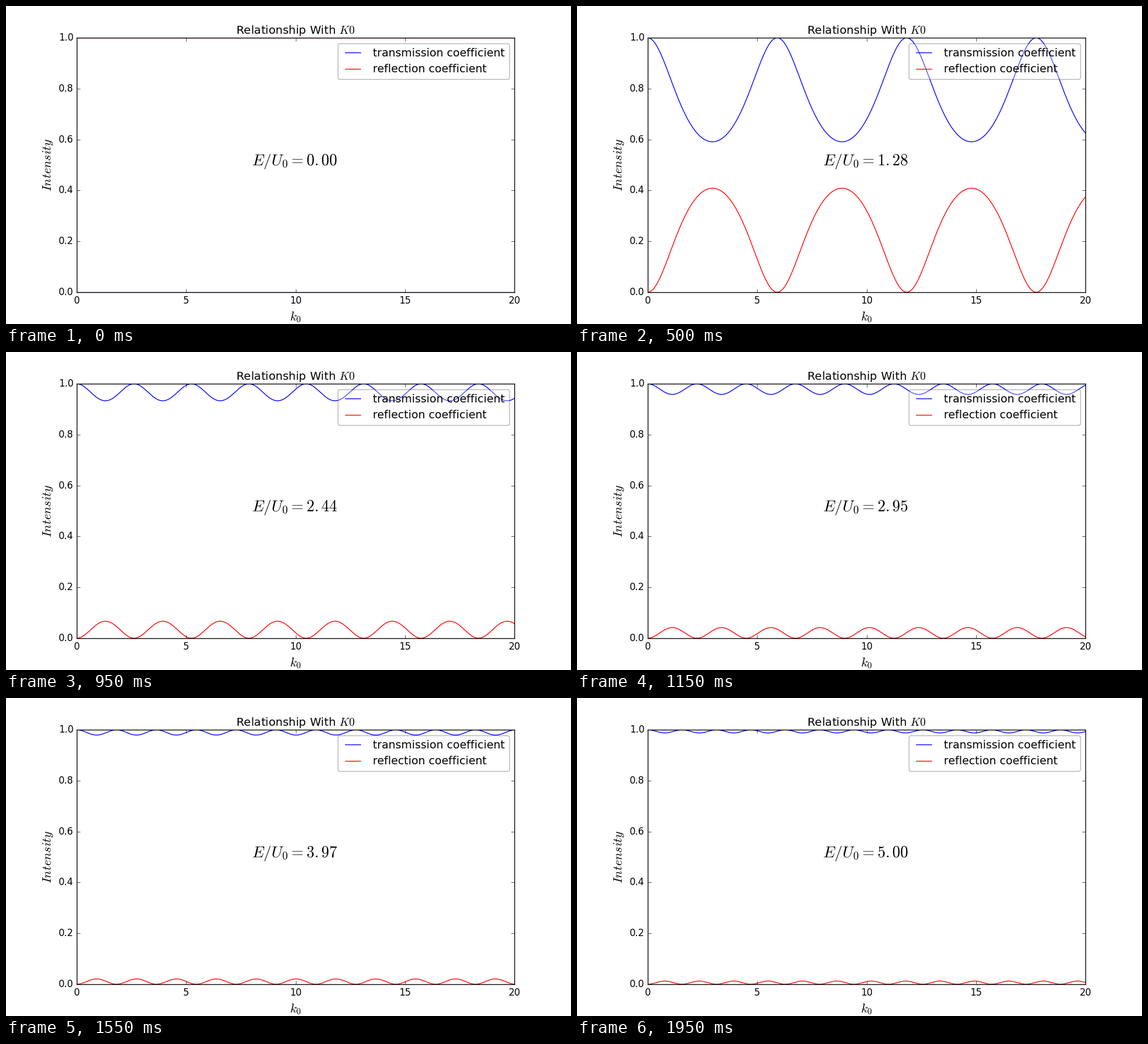
A matplotlib script for the animation above (2000 ms loop, 998 by 561 pixels).

```python
import numpy as np
import matplotlib.pyplot as plt
from matplotlib.animation import FuncAnimation

FRAMES = 40
plt.style.use("classic")
plt.rcParams.update({
    "font.sans-serif": ["DejaVu Sans"],
    "legend.fontsize": 14,
    "xtick.major.pad": 4.7,
})

# Barrier width in reduced units; starts just above 0 to avoid 0/0
k0 = np.linspace(1e-9, 20, 1000)
energies = np.linspace(0, 5, FRAMES)


def transmission(e):
    """Transmission through a square barrier at energy ratio e = E/U0."""
    wave = np.sinh if e < 1 else np.sin
    s2 = wave(k0 * np.sqrt(abs(1 - e))) ** 2
    d = 4 * e * abs(1 - e)
    return d / (d + s2)


def caption(e):
    # The empty group keeps the wide gap after the decimal point
    return "$E/U_0=" + f"{e:.2f}".replace(".", ".{}") + "$"


fig, ax = plt.subplots(figsize=(9.98, 5.61), dpi=100, facecolor="w")
fig.subplots_adjust(left=0.1251, right=0.9001)
trans, = ax.plot([], [], "b", label="transmission coefficient")
refl, = ax.plot([], [], "r", label="reflection coefficient")
note = ax.text(8, 0.5, "", fontsize=20)

ax.set_xlim(0, 20)
ax.set_ylim(0, 1)
ax.set_title("Relationship With $K0$")
ax.set_xlabel("$k_0$", fontsize=16)
ax.set_ylabel("$Intensity$", fontsize=16)
ax.legend(loc="upper right", fancybox=True, framealpha=0.3)


def update(i):
    e = energies[i]
    t = transmission(e)
    trans.set_data(k0, t)
    refl.set_data(k0, 1 - t)
    note.set_text(caption(e))
    return trans, refl, note


anim = FuncAnimation(fig, update, frames=FRAMES, interval=50,
                     repeat=True, repeat_delay=0)
plt.show()
```
